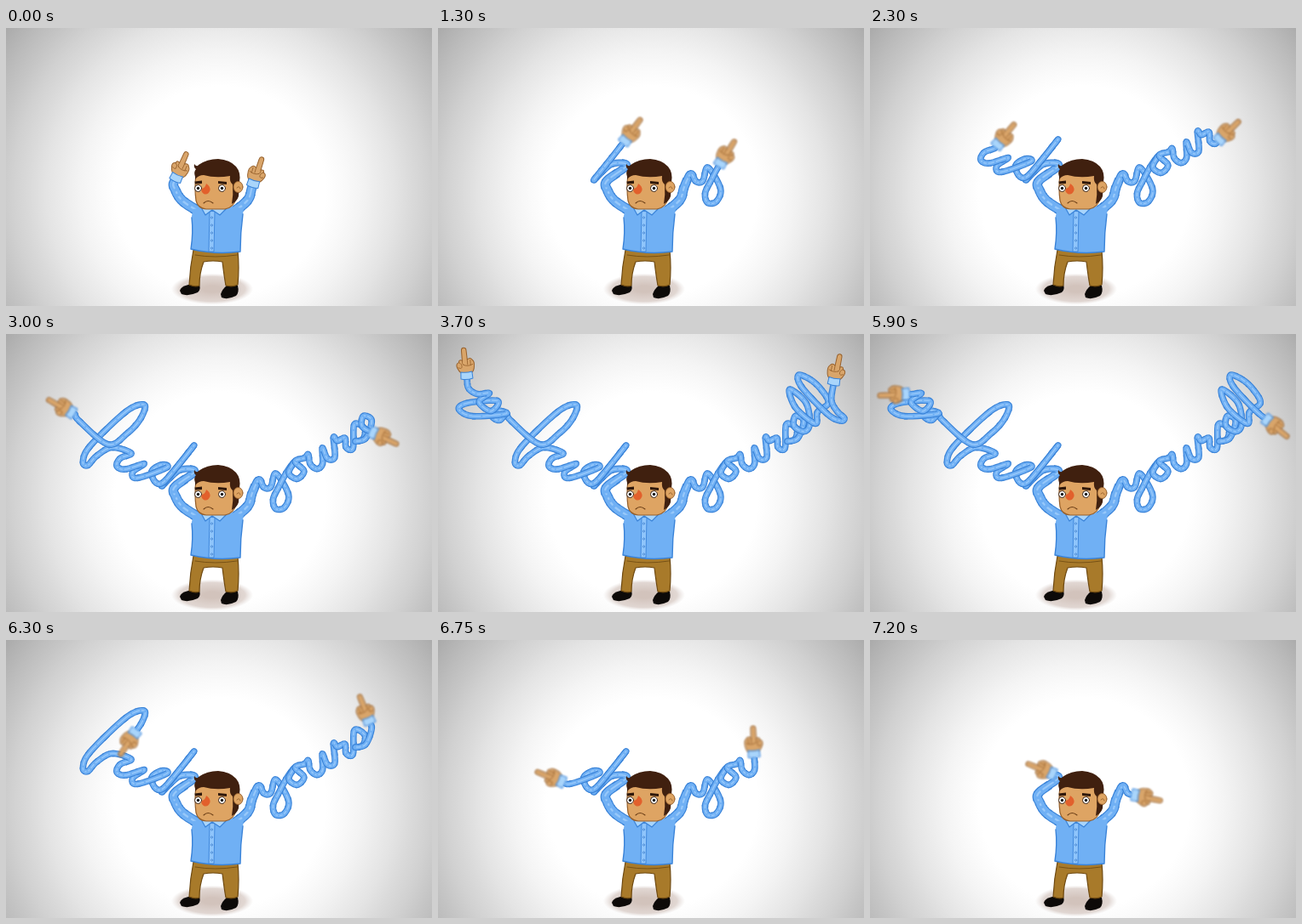
An HTML page with a canvas that plays this animation: 500x327 px, repeating every 7.25 s.

```html
<!DOCTYPE html>
<html lang="en">
<head>
<meta charset="utf-8">
<title>Long arms</title>
<style>
html, body { margin: 0; width: 100%; height: 100%; overflow: hidden; background: #fff; }
canvas { display: block; width: 100%; height: 100%; }
</style>
</head>
<body>
<canvas id="stage" width="500" height="327"></canvas>
<script>
const ctx = document.getElementById('stage').getContext('2d');
const LOOP = 7250, LAST = 28;

const SKIN = '#dea463', SKIN_EDGE = '#96602c', HAND = '#d9a56a';
const BLUE = '#70b0f4', BLUE_EDGE = '#3a83d8', BLUE_LIGHT = '#97c8fa';
const HAIR = '#40200f', PANTS = '#a87a2a', PANTS_EDGE = '#6d4810';

function pairs(text) {
  const n = text.split(' ').map(Number);
  return n.filter((_, i) => i % 2 === 0).map((x, i) => [x, n[2 * i + 1]]);
}

// Pen strokes of the script: x along the baseline, y upwards
const script = {
  c: pairs('9 23 2 24 -4 13 5 3 14 4'),
  e: pairs('14 11 10 21 1 12 6 0 17 4'),
  f: pairs('-1 14 5 38 3 61 -6 77 -15 58 -14 0 -6 -20 1 -20 0 -5 5 14'),
  g: pairs('-25 6 -18 17 -16 1 1 4 -5 18 -22 -9 -22 -22 -6 -16'),
  k: pairs('5 25 12 57 7 33 3 15 0 0 10 24 27 28'),
  o: pairs('14 20 1 12 5 1 17 5 15 20 27 18'),
  r: pairs('6 20 7 14 16 12 10 2 16 -3'),
  s: pairs('11 19 17 8 8 -1 -1 2 11 -2'),
  u: pairs('5 19 0 8 3 -1 12 1 23 17 20 3 28 0'),
  y: pairs('-10 22 -10 11 -3 8 11 19 9 -10 -4 -21 -13 -17 -9 -6 4 3 22 14')
};
script.l = script.e.map(([x, y]) => [x, y * 2.4]);

// Letters are [name, x, size, steps to write], from the body outwards.
// The baseline is the parabola y0 + slope * d + bend * d * d, d = x - x0.
const left = makeArm({
  flip: 1, backwards: true, slant: 0.175,
  base: { x0: 183, y0: 179, slope: 0.307, bend: -0.0031 },
  shoulder: '230 218 208 204 199 191 198 180',
  letters: [['k', 183, 1, 5], ['c', 168, 1, 4], ['u', 128, 1.1, 5],
            ['f', 110, 1, 6], ['o', 60, 0.75, 3], ['g', 58, 1, 4]],
  tip: '36 64 34 53'
});
const right = makeArm({
  flip: -1, backwards: false, slant: -0.1,
  base: { x0: 318, y0: 185, slope: -0.55, bend: -0.0007 },
  shoulder: '268 216 284 202 289 187',
  letters: [['y', 318, 1, 4], ['o', 338, 1, 4], ['u', 362, 1, 3], ['r', 392, 1, 3],
            ['s', 412, 1, 4], ['e', 425, 1, 4], ['l', 438, 1, 4], ['f', 466, 0.75, 1.6]],
  tip: '464 60'
});

function makeArm({ flip, backwards, slant, base, shoulder, letters, tip }) {
  const pts = pairs(shoulder), wrist = pts.length - 1;
  const marks = [[0, wrist]];
  let step = 0;
  for (const [name, x, size, steps] of letters) {
    const d = x - base.x0;
    const y = base.y0 + base.slope * d + base.bend * d * d;
    const turn = Math.atan(base.slope + 2 * base.bend * d);
    const cos = Math.cos(turn) * size, sin = Math.sin(turn) * size;
    const placed = script[name].map(([u, v]) => {
      u += slant * v;
      return [x + u * cos + v * sin, y + u * sin - v * cos];
    });
    pts.push(...(backwards ? placed.reverse() : placed));
    marks.push([step += steps, pts.length - 1]);
  }
  pts.push(...pairs(tip));
  marks.push([LAST, pts.length - 1]);
  return { flip, pts, wrist, marks };
}

// Catmull-Rom position at u
function at(pts, u) {
  const n = pts.length - 1;
  const i = Math.min(Math.floor(u), n - 1), t = u - i;
  const p = j => pts[Math.max(0, Math.min(n, j))];
  const a = p(i - 1), b = p(i), c = p(i + 1), d = p(i + 2);
  return [0, 1].map(m => 0.5 * (2 * b[m] + (c[m] - a[m]) * t
    + (2 * a[m] - 5 * b[m] + 4 * c[m] - d[m]) * t * t
    + (3 * b[m] - a[m] - 3 * c[m] + d[m]) * t * t * t));
}

function reach(marks, step) {
  const i = Math.max(1, marks.findIndex(m => m[0] >= step - 1e-6));
  const [s0, u0] = marks[i - 1], [s1, u1] = marks[i];
  return u0 + (u1 - u0) * (step - s0) / (s1 - s0);
}

function shape(d, fill, edge, width = 1.2) {
  const p = new Path2D(d);
  if (fill) { ctx.fillStyle = fill; ctx.fill(p); }
  if (edge) { ctx.strokeStyle = edge; ctx.lineWidth = width; ctx.stroke(p); }
}

function oval(x, y, rx, ry, fill, edge) {
  ctx.beginPath();
  ctx.ellipse(x, y, rx, ry, 0, 0, 7);
  if (fill) { ctx.fillStyle = fill; ctx.fill(); }
  if (edge) { ctx.strokeStyle = edge; ctx.lineWidth = 1; ctx.stroke(); }
}

function polyline(pts, width, color, cap) {
  ctx.beginPath();
  pts.forEach(p => ctx.lineTo(...p));
  ctx.lineWidth = width;
  ctx.strokeStyle = color;
  ctx.lineCap = cap;
  ctx.stroke();
}

function drawHand([x, y], angle, flip, moving) {
  ctx.save();
  ctx.translate(x, y);
  ctx.rotate(angle);
  ctx.scale(flip, 1);
  if (moving) ctx.filter = 'blur(1px)';
  shape('M-4-22V-34Q-4-37-1.5-37Q1.5-37 1.5-34L2-23Q6-26 8-22Q10.5-20 9.5-14Q9-9 6-7H-6'
    + 'Q-9-10-10.5-14Q-12-19-8-20Q-8-24-4-22Z', HAND, SKIN_EDGE, 1);
  shape('M-4-22Q-5-18-3-17M2-23V-17M5.5-22V-16M-8-20Q-4-18-5-14Q-6-12-9-14M-3-17Q2-14 8-17', null, SKIN_EDGE, 0.8);
  shape('M-6.5-8.5Q0-7 6.5-8.5L7-.5Q0 1.5-7-.5Z', '#a9d5fb', BLUE_EDGE, 1);
  ctx.restore();
}

// Painted piece by piece so that later strokes cross over earlier ones
function drawArm({ pts, wrist, marks, flip }, step) {
  const end = reach(marks, step), count = Math.ceil(end * 8), piece = 4;
  const line = Array.from({ length: count + 1 }, (_, i) => at(pts, Math.min(end, i / 8)));
  for (let i = 0; i < count; i += piece) {
    const u = i / 8;
    const w = u < wrist ? 12.5 - 1.5 * u / wrist : Math.max(7.6, 11 - (u - wrist) * 2);
    const part = back => line.slice(Math.max(0, i - back), i + piece + 1);
    polyline(part(1), w, BLUE_EDGE, 'butt');
    polyline(part(2), w - 2.4, BLUE, 'round');
    polyline(part(2), w * 0.2, BLUE_LIGHT, 'round');
  }
  const a = line[count], b = at(pts, end - 0.3);
  drawHand(a, Math.atan2(a[0] - b[0], b[1] - a[1]), flip, step > 0 && step < LAST);
}

function drawRoom() {
  const g = ctx.createRadialGradient(252, 192, 0, 252, 192, 325);
  for (let p = 0.38; p < 1.01; p += 0.062) {
    const v = Math.round(255 - 90 * Math.pow((p - 0.38) / 0.62, 1.3));
    g.addColorStop(Math.min(1, p), `rgb(${v},${v},${v})`);
  }
  ctx.fillStyle = g;
  ctx.fillRect(0, 0, 500, 327);

  ctx.save();
  ctx.translate(242, 307);
  ctx.scale(1, 0.38);
  const s = ctx.createRadialGradient(0, 0, 10, 0, 0, 48);
  s.addColorStop(0, 'rgba(180,155,143,.6)');
  s.addColorStop(0.75, 'rgba(195,175,166,.5)');
  s.addColorStop(1, 'rgba(205,190,185,0)');
  ctx.fillStyle = s;
  ctx.fillRect(-50, -50, 100, 100);
  ctx.restore();
}

function drawBody() {
  shape('M204 309Q205 304 214 302H227Q229 308 225 311Q214 316 206 313Z', '#0d0a08');
  shape('M252 313Q254 307 259 303H272Q274 311 270 315Q260 320 253 317Z', '#0d0a08');
  shape('M220 261Q216 281 215 302Q222 305 227 303Q227 288 232 275Q243 273 254 275Q256 292 258 303'
    + 'Q266 305 272 302Q274 282 272 262Z', PANTS, PANTS_EDGE);
  shape('M222 267Q245 271 271 267', null, PANTS_EDGE, 0.8);
  shape('M220 213Q250 207 279 212Q275 238 275 263Q246 267 217 260Q220 240 218 221Z', BLUE);
  shape('M218 223Q220 241 217 260Q246 267 275 263Q275 241 278 219', null, BLUE_EDGE, 1.4);
  shape('M239 216L238 263H244L245 216Z', '#8fc5fb', BLUE_EDGE, 0.9);
  for (let y = 223; y < 262; y += 9) oval(241.5, y, 1, 1, '#dcefff', BLUE_EDGE);
  shape('M229 211L234 220L242 214L251 220L260 211Z', '#a9d5fb', BLUE_EDGE);
}

function drawHead(blink) {
  shape('M223 172Q221 188 223 203Q225 212 235 213H257Q268 211 270 200L271 170Z', SKIN, SKIN_EDGE);
  shape('M222 175Q220 169 223 166Q220 164 221 160Q224 164 226 161Q236 154 249 154Q263 155 270 163'
    + 'Q276 170 274 181L273 198Q271 204 265 207Q267 196 266 184Q262 181 263 174'
    + 'Q246 177 232 173Q226 173 222 178Z', HAIR);
  oval(272.5, 187, 5.5, 6.5, SKIN, SKIN_EDGE);
  shape('M271 188Q274 185 275 189', null, SKIN_EDGE, 0.9);
  shape('M221.5 180.5L230 179.5V183L222 183.5ZM249 180L259 181V184L249 183Z', '#2f180b');
  for (const x of [225.5, 253.5]) {
    if (blink) {
      shape(`M${x - 4} 189Q${x} 191 ${x + 4} 189`, null, '#4b2a12', 1.3);
    } else {
      oval(x, 188.5, 4, 4, '#fff', '#39200f');
      oval(x, 188.5, 1.7, 1.7, '#111');
    }
  }
  shape('M235 183Q240 186 239.5 191Q237 197 232 195Q228 192 230 189Q234 188 235 183Z', '#e2602c');
  shape('M232 206Q237 201 243 206', null, '#6a3d16', 1.1);
}

function stepAt(t) {
  if (t < 1000) return 0;
  if (t < 5900) return Math.min(LAST, Math.floor((t - 900) / 100));
  return LAST - 1 - Math.floor((t - 5900) / 50);
}

let shown = '';
const start = performance.now();
function frame() {
  const t = Math.max(0, performance.now() - start) % LOOP;
  const step = stepAt(t), blink = t >= 4700 && t < 4900;
  const key = step + ' ' + blink;
  if (key !== shown) {
    shown = key;
    ctx.lineJoin = 'round';
    drawRoom();
    drawArm(left, step);
    drawArm(right, step);
    drawBody();
    drawHead(blink);
  }
  requestAnimationFrame(frame);
}
frame();
</script>
</body>
</html>
```
